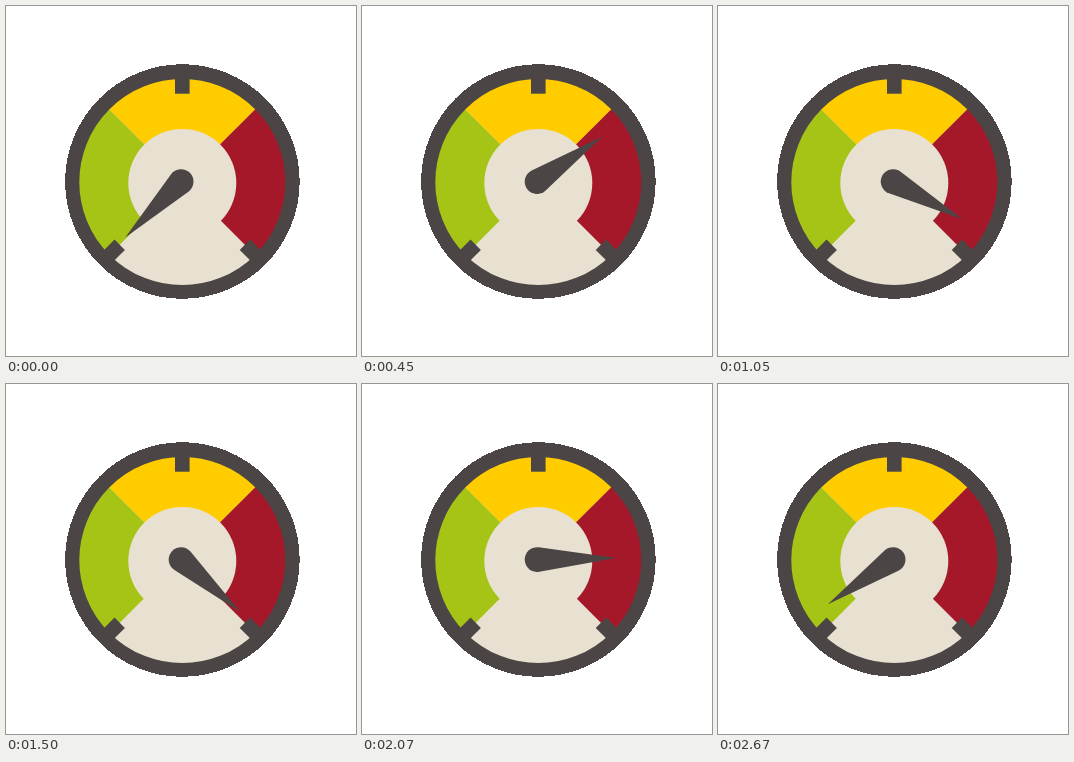
An HTML page for the animation above (2.7 s loop, 350 by 350 pixels).

```html
<!DOCTYPE html>
<html lang="en">
<head>
<meta charset="utf-8">
<title>Gauge</title>
<style>
  html, body { margin: 0; width: 100%; height: 100%; overflow: hidden; background: #fff; }
  svg { display: block; width: 100vw; height: 100vh; }
  .dark { fill: #4b4645; }
  .pale { fill: #e8e0d0; }
  .ring { fill: none; stroke: #4b4645; stroke-width: 8; }
</style>
</head>
<body>
<svg viewBox="0 0 350 350">
  <filter id="soft" filterUnits="userSpaceOnUse" x="0" y="0" width="350" height="350" color-interpolation-filters="sRGB">
    <feGaussianBlur stdDeviation="0.6"/>
  </filter>
  <circle class="dark" cx="176.4" cy="175.5" r="117.3" shape-rendering="crispEdges"/>
  <g filter="url(#soft)">
    <circle class="pale" cx="176.3" cy="176.1" r="105"/>
    <g id="zones"></g>
    <circle class="pale" cx="176.3" cy="177" r="54"/>
    <circle class="ring" cx="176.3" cy="176.1" r="107"/>
    <g id="ticks" class="dark"></g>
    <path id="needle" class="dark"/>
  </g>
</svg>
<script>
  const LOOP = 2700, STEP = 30;
  const CX = 176.3, CY = 176.2;
  const byId = id => document.getElementById(id);

  // Angles are in degrees, clockwise from straight up.
  const point = (deg, r) => {
    const a = deg * Math.PI / 180;
    return `${CX + r * Math.sin(a)} ${CY - r * Math.cos(a)}`;
  };
  const zone = (from, to, color) =>
    `<path fill="${color}" d="M${point(from, 50)}L${point(from, 105)}` +
    `A105 105 0 0 1 ${point(to, 105)}L${point(to, 50)}Z"/>`;

  byId('zones').innerHTML =
    zone(-135, -45, '#a5c416') + zone(-45, 45, '#ffcc00') + zone(45, 135, '#a5182a');
  byId('ticks').innerHTML = [-135, 0, 135].map(deg =>
    `<rect x="${CX - 7.3}" y="${CY - 106}" width="14.6" height="17.5" transform="rotate(${deg} ${CX} ${CY})"/>`
  ).join('');

  // Teardrop: a round hub with straight tangents to the tip.
  const HUB = 12.4, TIP = 79;
  const lift = HUB * HUB / TIP;
  const half = Math.sqrt(HUB * HUB - lift * lift);
  const needle = byId('needle');
  needle.setAttribute('d',
    `M0 ${-TIP}L${half} ${-lift}A${HUB} ${HUB} 0 1 1 ${-half} ${-lift}Z`);

  // [ms, angle]: sweep up, flutter near the maximum, fall back.
  const keys = [
    [0, -135], [630, 131.5], [780, 116.5], [915, 131], [1070, 116.5],
    [1200, 131], [1350, 116.5], [1500, 131.5], [1560, 131.5],
    [1755, 116.5], [1950, 131.5], [LOOP, -135]
  ];
  const angleAt = t => {
    const i = keys.findIndex(k => k[0] > t);
    const [t0, a0] = keys[i - 1], [t1, a1] = keys[i];
    return a0 + (a1 - a0) * (t - t0) / (t1 - t0);
  };

  const start = performance.now();
  function draw(now) {
    const t = Math.floor((Math.max(0, now - start) % LOOP) / STEP) * STEP;
    needle.setAttribute('transform', `translate(175.1 175.6) rotate(${angleAt(t)})`);
    requestAnimationFrame(draw);
  }
  draw(start);
</script>
</body>
</html>
```
